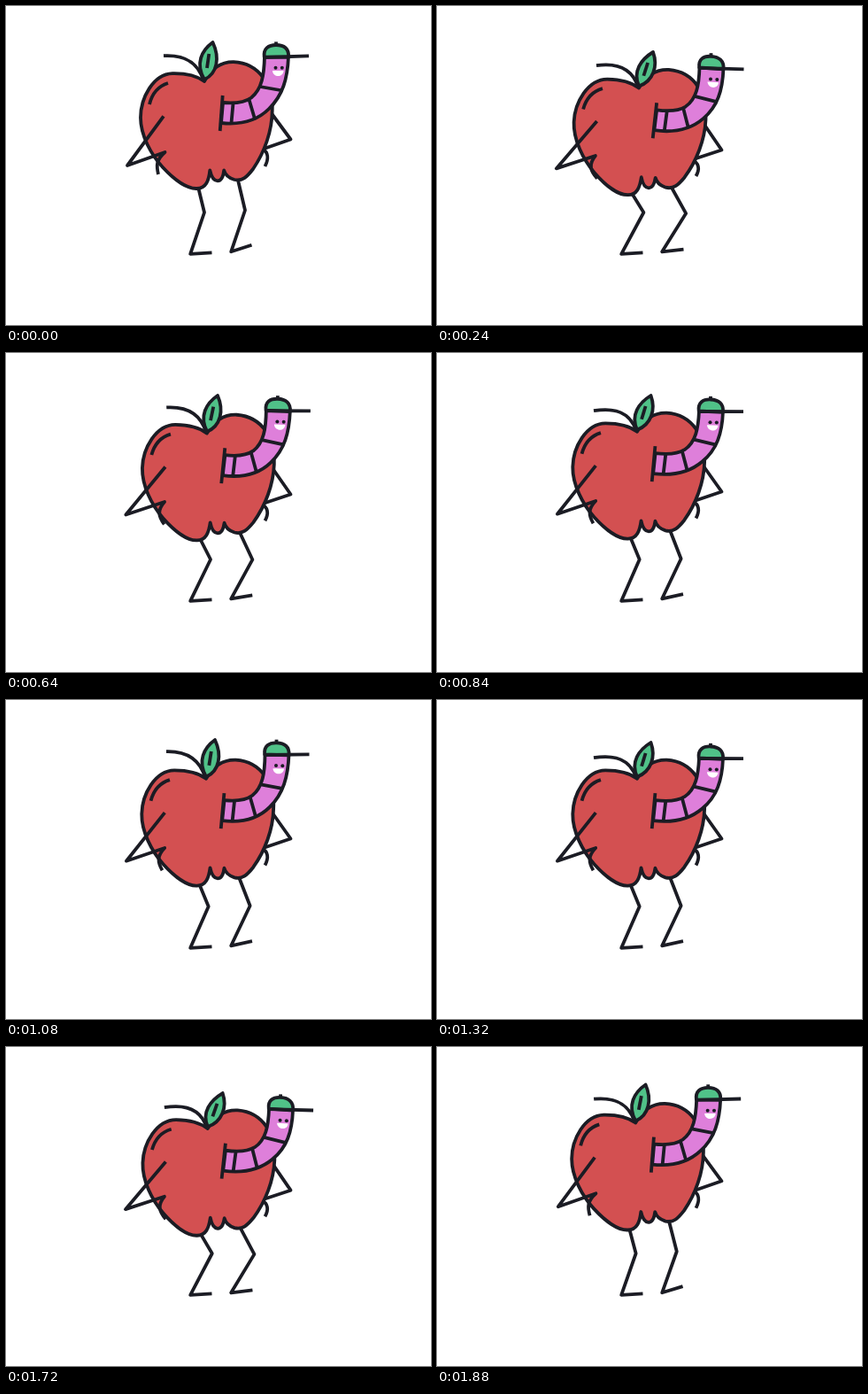
These frames come from a looping animation (480x360 px, 1920 ms). An HTML page with a canvas:

```html
<!DOCTYPE html>
<html lang="en">
<head>
<meta charset="utf-8">
<title>Apple and worm</title>
<style>
  html, body { margin: 0; width: 100%; height: 100%; overflow: hidden; background: #fff; }
  canvas { display: block; width: 480px; height: 360px; }
</style>
</head>
<body>
<canvas id="stage" width="480" height="360"></canvas>
<script>
const ctx = document.getElementById('stage').getContext('2d');
const BEAT = 480, STEP = 40;
const INK = '#1b1c24', RED = '#d35051', PINK = '#de7fda', GREEN = '#50c188';

const clamp = v => Math.max(0, Math.min(1, v));
const mix = (a, b, w) => [a[0] + (b[0] - a[0]) * w, a[1] + (b[1] - a[1]) * w];

// Stroke and optionally fill a path whose points pass through a deformation.
function shape(map, d, fill, stroke = true) {
  const moved = d.replace(/([\d.]+) ([\d.]+)/g, (_, x, y) => map(+x, +y).join(' '));
  const path = new Path2D(moved);
  if (fill) {
    ctx.fillStyle = fill;
    ctx.fill(path);
  }
  if (stroke) ctx.stroke(path);
}

function dot(map, x, y, r) {
  ctx.beginPath();
  ctx.arc(...map(x, y), r, 0, Math.PI * 2);
  ctx.fillStyle = INK;
  ctx.fill();
}

function draw(time) {
  const a = Math.floor(time / STEP) * STEP % BEAT / BEAT * Math.PI * 2;
  const dip = 1 - Math.cos(a), lag = Math.sin(a);

  const body = (x, y) => {
    const r = dip * Math.PI / 180, c = Math.cos(r), s = Math.sin(r);
    const dx = x - 215, dy = y - 200;
    return [215 + dx * c - dy * s, 200 + dx * s + dy * c + 3.6 * dip];
  };
  const head = (x, y) => {
    const tilt = (x - 292) / 50;
    return [x + 2.25 * dip - 1.75 * lag, y + (6 + 1.5 * tilt) * dip - (2 + 0.4 * tilt) * lag];
  };
  const worm = (x, y) => mix(body(x, y), head(x, y), clamp((x - y - 140) / 90));
  const leaf = (x, y) => mix(body(x, y),
    [x + 5.25 * dip - 2.75 * lag, y + 5.5 * dip - 1.5 * lag], clamp((83 - y) / 42));
  const stem = (x, y) => mix(body(x, y),
    [x + dip + 2 * lag, y + 5.5 * dip - 3.5 * lag], clamp((223 - x) / 45));
  // Point that shifts by (dx, dy) as the body dips.
  const p = (x, y, dx = 0, dy = 0) => `${x + dx * dip} ${y + dy * dip}`;
  const still = (x, y) => [x, y];
  const limb = d => shape(still, d);

  ctx.fillStyle = '#fff';
  ctx.fillRect(0, 0, 480, 360);
  ctx.strokeStyle = INK;
  ctx.lineWidth = 3.8;
  ctx.lineJoin = 'round';
  ctx.lineCap = 'butt';

  // Legs
  limb(`M${p(215.5, 198, 0, 3)}L${p(224, 233, 4.7, 0)}L208.2 279.8L232.5 278.4`);
  limb(`M${p(260, 188, 0, 4)}L${p(270, 230.5, 5.6, 1.8)}L254.2 277.3L${p(277.5, 269.8, 0.5, 2.4)}`);

  // Far arm
  limb(`M${p(294.5, 114, 1, 6)}L${p(321.5, 150.5, 0, 6)}L${p(290, 161.5, -1, 6)}`);
  limb(`M${p(290, 161.5, -1, 6)}C${p(296, 165, 0, 6)} ${p(297, 172, 0, 6)} ${p(292.5, 181, 0, 5.5)}`);

  // Apple
  shape(body, 'M224 85C213 77 199 76 188 76.2C166 77 152 104 152 126C152 146 164 168 177 182' +
    'C189 195 204 206.5 215.5 206C226 206 229 197 230.3 185.5C232 193 235 197.3 239 197.3' +
    'C243 197.3 245.3 193 246.2 185.5C248 192 253 194.5 258 196C267 198 272 193 279 184' +
    'C292 165 300.5 141 300.7 118C302 91 287 64.5 257 63.2C241 63 231 72 224 85Z', RED);
  shape(body, 'M162 111C165 98.5 172 90.5 183 87');

  // Stem and leaf
  shape(stem, 'M178 56.2C200 55 216 62 223 84');
  shape(leaf, 'M233.5 41C221 50 213.5 65 224 83C239 76 241.5 58 233.5 41Z', GREEN);
  shape(leaf, 'M229.3 54L227 70');

  // Worm
  shape(worm, 'M292 57C291.5 78 289 94 277 103.5C268 110 256 110 245 109L243 132' +
    'C262 134 282 131 297 116C312.5 101 318 82 319 57Z', PINK);
  shape(worm, 'M256.5 110L254.5 132M274.5 105.5L281.3 128.5M286.8 91L312.5 95.5');
  shape(body, 'M244.7 101L241.7 141');
  dot(head, 304.5, 69.8, 2);
  dot(head, 311.8, 69.8, 2);
  shape(head, 'M301 73L313.5 73C313 81 301.5 81 301 73Z', '#fff', false);

  // Cap
  shape(head, 'M305 45L305 40.4');
  shape(head, 'M291.7 57.5C290.5 48 296.5 44 305 44C314 44 320 48 319 57.8Z', GREEN);
  shape(head, 'M291.5 58L342 56.3');

  // Near arm
  limb(`M${p(178, 124.3, 1.3, 2.8)}L${p(137, 180, -1.1, 1.7)}L${p(179.5, 165, -0.3, 2)}` +
    `C${p(169, 174, 1, 2.3)} ${p(170, 181, 1.5, 2.5)} ${p(172, 190, 4.5, 2.3)}`);
}

function tick(now) {
  draw(now);
  requestAnimationFrame(tick);
}
draw(0);
requestAnimationFrame(tick);
</script>
</body>
</html>
```
